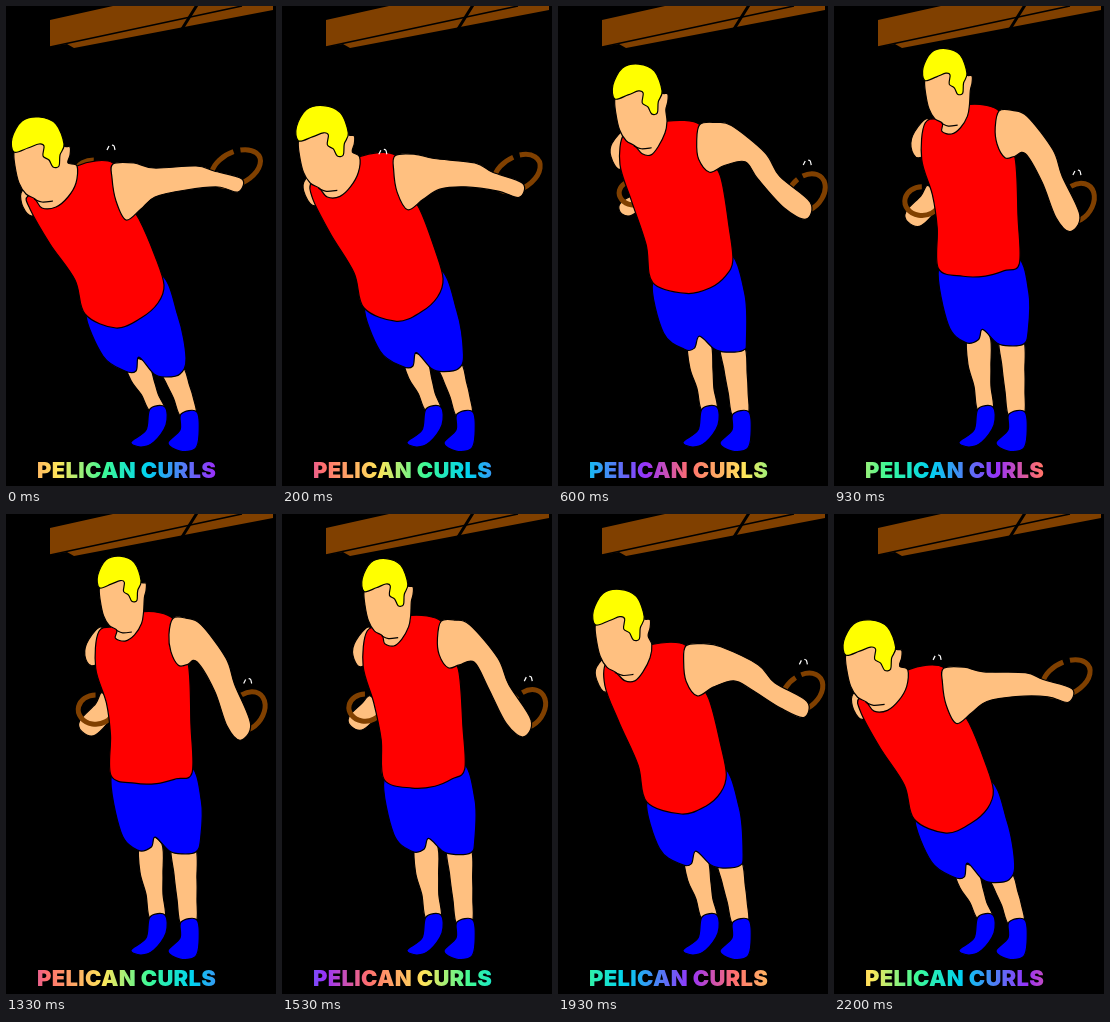
Write an HTML page with a canvas that moves like this. It is 270 by 480 pixels and loops after 2270 ms.

```html
<!DOCTYPE html>
<html lang="en">
<head>
<meta charset="utf-8">
<title>Pelican curls</title>
<style>
html, body { margin: 0; width: 100%; height: 100%; overflow: hidden; background: #000; }
canvas { position: absolute; left: 0; top: 0; }
#title {
  position: absolute; left: 0; top: 454px; width: 239px; padding-left: 31px;
  font: 900 22px/20px Inter, Lato, sans-serif; letter-spacing: .3px; white-space: nowrap;
  color: transparent;
  background: linear-gradient(90deg, #ff6e6e, #ffe65a 22%, #3cfa96 40%, #00d2f0 57%,
    #9632fa 83%, #ff6e6e) 0 0 / 255px 100%;
  -webkit-background-clip: text; background-clip: text;
}
</style>
</head>
<body>
<canvas id="stage" width="270" height="480"></canvas>
<div id="title">PELICAN CURLS</div>
<script>
const ctx = document.getElementById('stage').getContext('2d');
const title = document.getElementById('title');
const SKIN = '#ffc080', RED = '#f00', BLUE = '#00f', YELLOW = '#ff0', BROWN = '#804000';

const points = s => s.split(' ').map(p => p.split(',').map(Number));
const poses = (...rows) => rows.map(points);

// Parts that bend: leaning forward, halfway, upright
const shirt = poses(
  '71,160 107,157 118,190 133,213 149,250 158,279 152,297 135,312 110,322 79,308 69,274 44,238 24,203 22,190 45,185',
  '107,117 140,120 146,148 161,172 170,222 174,255 167,271 152,283 128,289 94,278 87,240 72,197 60,160 64,130 85,128',
  '140,97 169,104 172,130 184,150 186,210 187,260 170,265 150,269 128,268 106,261 106,220 103,190 92,155 95,118 115,112');
const shorts = poses(
  '100,300 152,268 172,310 180,352 174,368 160,371 148,368 133,351 130,365 119,365 97,350 80,308',
  '120,270 168,246 186,288 188,335 185,345 168,347 156,344 141,331 136,343 126,344 105,328 94,278',
  '125,250 182,250 196,288 195,325 190,338 177,340 164,337 150,323 146,333 132,336 116,318 106,262');
const arm = poses(
  '107,158 128,157 148,162 190,160 208,165 236,173 232,186 212,181 180,184 149,191 135,203 120,214 110,195 106,172',
  '140,120 156,118 172,121 206,147 221,170 252,195 248,212 226,201 199,173 186,157 165,161 150,168 139,155 137,137',
  '169,104 182,104 197,111 221,144 229,170 243,211 232,227 220,213 209,178 190,148 182,151 174,151 167,137 165,120');
const neck = poses(
  '71,160 70,177 62,191 50,201 36,202',
  '107,117 105,129 98,143 91,151 82,150',
  '140,97 138,109 131,120 121,126 111,123');
const farShoulder = poses(
  '24,182 15,187 17,201 26,210 40,200',
  '66,126 52,139 51,152 60,165 75,150',
  '98,114 85,126 81,142 88,152 105,140');
const farHand = poses(
  '95,205 85,207 80,212 82,218 90,219 100,210',
  '80,190 68,193 61,200 64,208 74,209 85,198',
  '99,178 93,190 76,208 78,219 92,223 110,200');

// Rings: centre, radii, tilt
const farRing = poses('88,166 20,14 0', '76,186 17,14 0', '92,196 20,17 0');
const nearRing = poses('230,162 28,18 -.45', '248,186 24,18 -.8', '239,198 24,18 -.9');

// The head keeps its shape: crown position and scale
const head = poses('33,111 1,1', '78,60 .95,1', '117,42 .82,.89');
const hair = points('-25,35 -27,21 -17,4 0,0 17,7 25,27 21,38 20,49 14,50 10,43 4,39 5,29 0,27 -11,31');
const skull = points('-20,20 20,20 25,29 31,30 31,38 29,46');
const jaw = points('-4,82 -13,77 -20,66 -24,49 -25,35');
const chin = points('-5,82 3,85 14,84');

const legs = poses(
  '140,320 156,330 157,360 157,380 159,404 144,405 140,380 134,358 133,330',
  '166,330 168,360 171,385 175,411 190,409 191,385 191,365 189,332');
const socks = poses(
  '144,403 159,401 160,419 148,436 135,441 125,436 140,424',
  '175,408 191,406 193,429 189,443 174,445 162,437 174,424');

// Quadratic through three values at u = 0, 1, 2
const quad = (a, b, c, u) => a * (1 - u) * (2 - u) / 2 + b * u * (2 - u) + c * u * (u - 1) / 2;
const blend = ([a, b, c], u) => a.map((p, i) => p.map((v, d) => quad(v, b[i][d], c[i][d], u)));

// Smooth curve through the points
function trace(pts, closed) {
  const n = pts.length;
  const at = i => closed ? pts[(i + n) % n] : pts[Math.max(0, Math.min(n - 1, i))];
  ctx.beginPath();
  ctx.moveTo(...pts[0]);
  for (let i = 0; i < (closed ? n : n - 1); i++) {
    const [a, b, c, d] = [at(i - 1), at(i), at(i + 1), at(i + 2)];
    ctx.bezierCurveTo(b[0] + (c[0] - a[0]) / 6, b[1] + (c[1] - a[1]) / 6,
      c[0] - (d[0] - b[0]) / 6, c[1] - (d[1] - b[1]) / 6, c[0], c[1]);
  }
}

function stroke(color, width) {
  ctx.strokeStyle = color;
  ctx.lineWidth = width;
  ctx.stroke();
}

function fill(pts, color) {
  trace(pts, true);
  ctx.fillStyle = color;
  ctx.fill();
  stroke('#000', 1.2);
}

function line(pts, color, width) {
  trace(pts, false);
  stroke(color, width);
}

function ring([[x, y], [rx, ry], [tilt]], from, to) {
  ctx.beginPath();
  ctx.ellipse(x, y, rx - 2, ry - 2, tilt, from, to);
  stroke(BROWN, 5);
}

function beam() {
  ctx.beginPath();
  points('44,14 107,0 267,0 267,4 68,42 61,38 44,41').forEach(p => ctx.lineTo(...p));
  ctx.fillStyle = BROWN;
  ctx.fill();
  line(points('44,41 236,0'), '#000', 1.6);
  line(points('191,-1 176,23'), '#000', 3);
}

function glint(x, y) {
  line([[x - 4, y + 3], [x - 2, y - 1]], '#fff', 1.2);
  line([[x + 1, y - 2], [x + 3, y - 1], [x + 4, y + 3]], '#fff', 1.2);
}

function draw(step) {
  const phi = Math.PI * step / 17.5;
  const u = 1 - Math.cos(phi) + .15 * Math.sin(phi) ** 2 * Math.abs(Math.sin(2 * phi));
  const part = (keys, color) => fill(blend(keys, u), color);
  const [[hx, hy], [sx, sy]] = blend(head, u);
  const onHead = pts => pts.map(([x, y]) => [hx + x * sx, hy + y * sy]);
  const far = blend(farRing, u), near = blend(nearRing, u);

  // Shins tilt about the ankles
  const lean = quad(1, .27, 0, u);
  const tilt = ([x, y]) => {
    const h = lean * Math.max(0, 404 - y);
    return [x - .19 * h, y + .37 * h];
  };

  ctx.fillStyle = '#000';
  ctx.fillRect(0, 0, 270, 480);
  beam();
  part(farShoulder, SKIN);
  part(farHand, SKIN);
  ring(far, .2, 4.7);
  legs.forEach(leg => fill(leg.map(tilt), SKIN));
  socks.forEach(sock => fill(sock, BLUE));
  part(shorts, BLUE);
  part(shirt, RED);
  fill([...onHead(skull), ...blend(neck, u), ...onHead(jaw)], SKIN);
  line(onHead(chin), '#000', 1.2);
  fill(onHead(hair), YELLOW);
  ring(near, -1.1, 4.9);
  part(arm, SKIN);
  if (u < .3) glint(far[0][0] + 17, far[0][1] - 25);
  else glint(near[0][0] + 1, near[0][1] - 31);
  title.style.backgroundPositionX = 32 + 15 * (step - 2.4) + 'px';
}

function tick() {
  const t = performance.now() % 2270;
  draw(Math.min(33, Math.floor((t + 3.4) * 3 / 200)));
  requestAnimationFrame(tick);
}
tick();
</script>
</body>
</html>
```
